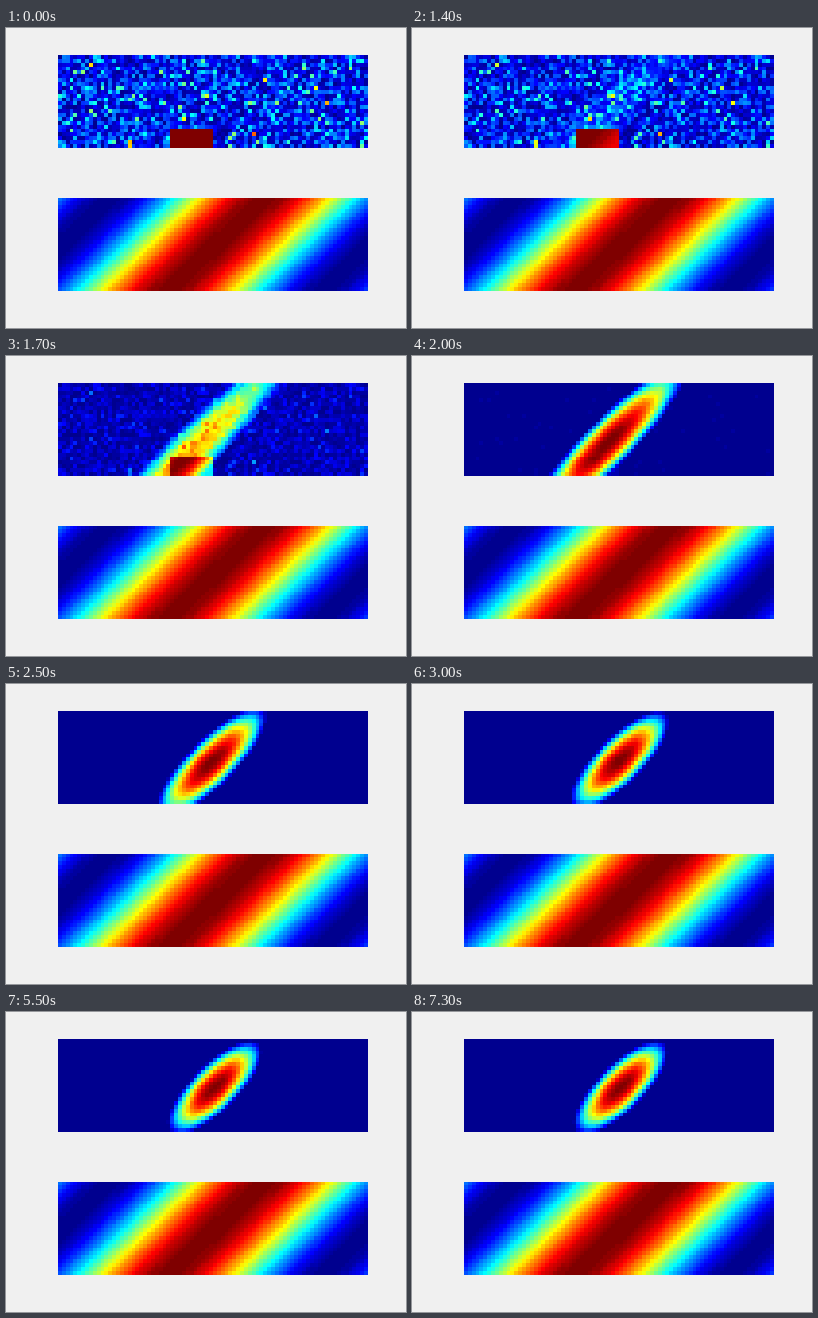
A matplotlib script that plays this animation: 400 by 300 pixels, repeating every 7.6 s.

```python
import numpy as np
import matplotlib.pyplot as plt
from matplotlib.animation import FuncAnimation
from matplotlib.colors import ListedColormap

W, H = 400, 300
COLS, ROWS = 80, 24
STEP_MS, FRAMES, HOLD = 100, 76, 13

col, row = np.meshgrid(np.arange(COLS), np.arange(ROWS))
dx, dy = col - 40.0, row - 12.0
across, along = dx + dy, dx - dy


def jet64():
    """Stepped 64-level rainbow from navy to maroon."""
    i = np.arange(1, 65)

    def ramp(k):
        return np.clip(np.minimum(k, 48 - k), 0, 16) / 16

    return ListedColormap(np.column_stack([ramp(i - 24), ramp(i - 8), ramp(i + 8)]))


def start_state():
    rng = np.random.default_rng(11)
    a = np.minimum(np.abs(rng.normal(0, 0.18, (ROWS, COLS))), 0.5)
    sparks = [(8, 2, .65), (53, 6, .64), (50, 20, .78), (32, 16, .62),
              (18, 22, .68), (18, 23, .66), (69, 12, .70), (38, 10, .58),
              (66, 8, .62)]
    for c, r, value in sparks:
        a[r, c] = value
    a[19:, 29:40] = 1
    return a


start = start_state()


def bump(k):
    """Rectified ridge that shortens and drifts to the centre."""
    fade = min(1, 0.78 ** (k - 4))
    length = 22.8 + 34 * fade
    width = 8.4 + 0.6 * fade
    u = (across + 0.8 * fade) / width
    v = (along + 13 * fade) / length
    return np.maximum(0, 1 - u**2 - v**2)


def activity(frame):
    k = max(0, frame - HOLD)
    if k == 0:
        return start
    noise = 1 / (1 + np.exp(0.9 * (k - 3.3)))
    a = noise * start + (1 - noise) * bump(k)
    a = a - a.min()
    return a / a.max()


fig = plt.figure(figsize=(W / 100, H / 100), dpi=100, facecolor="#f0f0f0")
cmap = jet64()


def panel(top, data):
    ax = fig.add_axes([52 / W, 1 - (top + 93) / H, 310 / W, 93 / H])
    ax.axis("off")
    return ax.imshow(data, cmap=cmap, vmin=0, vmax=1, aspect="auto",
                     interpolation="nearest")


upper = panel(27, start)
panel(170, 0.5 + 0.5 * np.cos(2 * np.pi * (dx + 1.05 * dy) / COLS))


def update(frame):
    upper.set_data(activity(frame))
    return [upper]


anim = FuncAnimation(fig, update, frames=FRAMES, interval=STEP_MS,
                     repeat=True, repeat_delay=0, blit=False)
plt.show()
```
